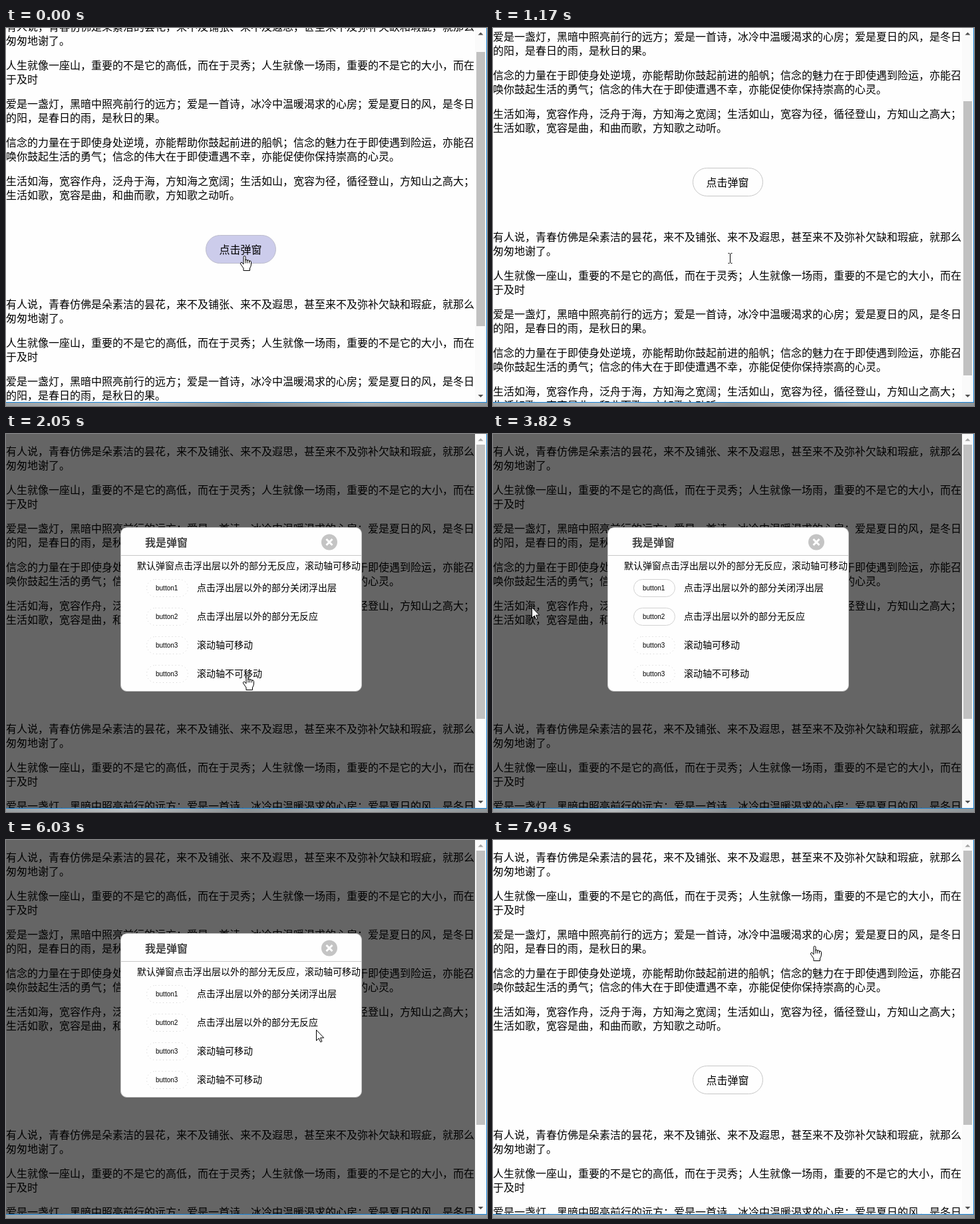
An HTML page with a canvas that plays this animation: 723 by 568 pixels, repeating every 8000 ms.

```html
<!DOCTYPE html>
<html lang="zh-CN">
<head>
<meta charset="utf-8">
<title>弹窗</title>
<style>
html, body { margin: 0; width: 100%; height: 100%; overflow: hidden; background: #fefefe; }
canvas { display: block; }
</style>
</head>
<body>
<canvas id="stage" width="723" height="568"></canvas>
<script>
const ctx = document.getElementById('stage').getContext('2d', { alpha: false });
const LOOP = 8000, PAGE_W = 705, PAGE_H = 562;
const CJK = '"Noto Sans CJK SC", "Noto Sans CJK", "Noto Sans CJK JP", sans-serif';
const LILAC = '#cccceb';

const LINES = [
  '有人说，青春仿佛是朵素洁的昙花，来不及铺张、来不及遐思，甚至来不及弥补欠缺和瑕疵，就那么',
  '匆匆地谢了。',
  '人生就像一座山，重要的不是它的高低，而在于灵秀；人生就像一场雨，重要的不是它的大小，而在',
  '于及时',
  '爱是一盏灯，黑暗中照亮前行的远方；爱是一首诗，冰冷中温暖渴求的心房；爱是夏日的风，是冬日',
  '的阳，是春日的雨，是秋日的果。',
  '信念的力量在于即使身处逆境，亦能帮助你鼓起前进的船帆；信念的魅力在于即使遇到险运，亦能召',
  '唤你鼓起生活的勇气；信念的伟大在于即使遭遇不幸，亦能促使你保持崇高的心灵。',
  '生活如海，宽容作舟，泛舟于海，方知海之宽阔；生活如山，宽容为径，循径登山，方知山之高大；',
  '生活如歌，宽容是曲，和曲而歌，方知歌之动听。'
];
const ROWS = [
  ['button1', '点击浮出层以外的部分关闭浮出层'],
  ['button2', '点击浮出层以外的部分无反应'],
  ['button3', '滚动轴可移动'],
  ['button3', '滚动轴不可移动']
];

// first step, last step, step count, then the pose reached: x, y, scroll, pointer, dialog open
const MOVES = [
  [0, 0, 1, 357, 342, 28, 'hand', false],
  [740, 890, 2, 356, 346, 160, 'beam', false],
  [1170, 1170, 1, 356, 346, 129, 'beam', false],
  [1320, 1470, 2, 356, 346, 0, 'beam', false],
  [1620, 1900, 3, 361, 362, 0, 'hand', false],
  [2050, 2050, 1, 361, 362, 0, 'hand', true],
  [2210, 2210, 1, 356, 349, 0, 'arrow', true],
  [2510, 2660, 2, 250, 270, 0, 'arrow', true],
  [2820, 2820, 1, 235, 235, 0, 'arrow', true],
  [2970, 2970, 1, 213, 221, 0, 'arrow', true],
  [3250, 3540, 3, 95, 268, 0, 'arrow', true],
  [3680, 3820, 2, 58, 260, 0, 'arrow', true],
  [4400, 4520, 2, 592, 361, 0, 'arrow', true],
  [4640, 4890, 3, 592, 361, 160, 'arrow', true],
  [5330, 5600, 3, 592, 361, 0, 'arrow', true],
  [5740, 6030, 3, 466, 285, 0, 'arrow', true],
  [6990, 7670, 6, 482, 159, 0, 'arrow', true],
  [7800, 7800, 1, 482, 159, 0, 'hand', true],
  [7940, 7940, 1, 482, 159, 0, 'hand', false]
];

const HAND = new Path2D('M6.5.5Q5 .5 5 2.2V13L3 10.6Q1.8 9.8.8 10.8T.9 13L5 19V22.5H14.5V19Q16.5 16 16.5 13V9.5Q16.3 8 15 8T13.6 9V7.8Q13 6.6 11.7 6.8T10.7 8V6.9Q10 6 9 6T8 7V2.2Q8 .5 6.5.5Z');
const FINGERS = new Path2D('M8 6V11.5M10.7 7V11.5M13.6 8V11.5');
const ARROW = new Path2D('M.5.5V16.5L4.3 13 6.8 18.6 9 17.6 6.6 12.2H11.7Z');
const BEAM = new Path2D('M-3 -8H-1M1 -8H3M-3 7H-1M1 7H3M0 -7.5V6.5');

function poseAt(t) {
  let i = MOVES.length - 1;
  while (t < MOVES[i][0]) i--;
  const [start, end, steps, x, y, scroll, pointer, open] = MOVES[i];
  const prev = MOVES[Math.max(0, i - 1)];
  const k = end > start ? Math.floor((t - start) / (end - start) * (steps - 1) + 0.001) : steps - 1;
  const p = Math.min(1, (k + 1) / steps);
  const mix = (a, b) => Math.round(a + (b - a) * p);
  return { x: mix(prev[3], x), y: mix(prev[4], y), scroll: mix(prev[5], scroll), pointer, open };
}

function text(str, x, y, size, color = '#000', weight = 350, family = CJK) {
  ctx.font = `${weight} ${size}px ${family}`;
  ctx.fillStyle = color;
  ctx.fillText(str, x, y);
}

function pill(x, y, w, h, r, fill, border) {
  ctx.beginPath();
  ctx.roundRect(x + 0.5, y + 0.5, w - 1, h - 1, r);
  ctx.fillStyle = fill;
  ctx.fill();
  ctx.strokeStyle = border;
  ctx.lineWidth = 1;
  ctx.stroke();
}

const inside = (p, x, y, w, h) => p.x >= x && p.x < x + w && p.y >= y && p.y < y + h;

function drawPage(pose) {
  for (const top of [32, 449]) {
    LINES.forEach((line, i) => {
      text(line, 0, top - pose.scroll + (i >> 1) * 58 + (i & 1) * 21, 16);
    });
  }
  const y = 339 - pose.scroll;
  const hover = !pose.open && inside(pose, 300, y, 106, 43);
  pill(300, y, 106, 43, 21, hover ? LILAC : '#fefefe', hover ? '#bdbdcc' : '#c6c6c6');
  text('点击弹窗', 320.5, y + 28, 16);
}

function drawDialog(pose, t) {
  ctx.fillStyle = 'rgba(0,0,0,.6)';
  ctx.fillRect(0, 0, PAGE_W, PAGE_H);
  pill(172, 140, 363, 247, 9, '#fefefe', '#c4c4c4');
  ctx.fillStyle = '#c8c8c8';
  ctx.fillRect(173, 182, 361, 1);
  text('我是弹窗', 209, 169, 16, '#444', 'bold');

  ctx.beginPath();
  ctx.arc(486, 162.5, 12, 0, Math.PI * 2);
  ctx.fillStyle = '#c4c4c4';
  ctx.fill();
  ctx.beginPath();
  ctx.moveTo(481.5, 158); ctx.lineTo(490.5, 167);
  ctx.moveTo(490.5, 158); ctx.lineTo(481.5, 167);
  ctx.strokeStyle = '#fff';
  ctx.lineWidth = 3;
  ctx.stroke();

  text('默认弹窗点击浮出层以外的部分无反应，滚动轴可移动', 197, 203, 14);
  ROWS.forEach(([label, note], i) => {
    const y = 218 + i * 43;
    const solid = t >= (i < 2 ? 2660 : 4400) && t < 5330;
    const hover = inside(pose, 214, y + 4, 58, 20);
    if (!solid) ctx.setLineDash([1, 4]);
    pill(211, y, 63, 27, 13, hover ? LILAC : '#fefefe', solid ? '#d2d2d2' : '#cfcfcf');
    ctx.setLineDash([]);
    text(label, 225, y + 17, 10, '#000', 400, '"Liberation Sans", Arial, sans-serif');
    text(note, 287, y + 18, 14);
  });
}

function triangle(y, dir, color) {
  ctx.beginPath();
  ctx.moveTo(709.5, y); ctx.lineTo(717.5, y); ctx.lineTo(713.5, y + 4 * dir);
  ctx.fillStyle = color;
  ctx.fill();
}

function drawFrame(scroll) {
  ctx.fillStyle = '#fafafa';
  ctx.fillRect(PAGE_W, 0, 17, PAGE_H);
  ctx.fillStyle = '#c1c1c1';
  ctx.fillRect(707, 16 + Math.round(scroll * 0.731), 13, 412);
  triangle(10.5, -1, scroll > 0 ? '#505050' : '#a3a3a3');
  triangle(551, 1, scroll < 160 ? '#505050' : '#b0b0b0');

  const strip = ctx.createLinearGradient(0, 0, 723, 0);
  ['#9aa0a3', '#b9bdbf', '#8b9194', '#a8adaf', '#8f9598'].forEach((c, i) => strip.addColorStop(i / 4, c));
  ctx.fillStyle = strip;
  ctx.fillRect(0, 563, 723, 5);
  ctx.fillStyle = '#1883d7';
  ctx.fillRect(722, 0, 1, 563);
  ctx.fillRect(0, 562, 723, 1);
}

function drawPointer({ x, y, pointer }) {
  ctx.save();
  ctx.strokeStyle = '#000';
  ctx.fillStyle = '#fff';
  ctx.lineWidth = 1;
  if (pointer === 'beam') {
    ctx.translate(x + 0.5, y + 0.5);
    ctx.stroke(BEAM);
  } else {
    const hand = pointer === 'hand';
    const shape = hand ? HAND : ARROW;
    ctx.translate(hand ? x - 5 : x, y);
    ctx.fill(shape);
    ctx.stroke(shape);
    if (hand) ctx.stroke(FINGERS);
  }
  ctx.restore();
}

function draw(now) {
  const t = now % LOOP;
  const pose = poseAt(t);
  ctx.fillStyle = '#fefefe';
  ctx.fillRect(0, 0, 723, 568);
  ctx.save();
  ctx.beginPath();
  ctx.rect(0, 0, PAGE_W, PAGE_H);
  ctx.clip();
  drawPage(pose);
  if (pose.open) drawDialog(pose, t);
  ctx.restore();
  drawFrame(pose.scroll);
  drawPointer(pose);
}

const begin = performance.now();
function tick() {
  draw(performance.now() - begin);
  requestAnimationFrame(tick);
}
tick();
</script>
</body>
</html>
```
